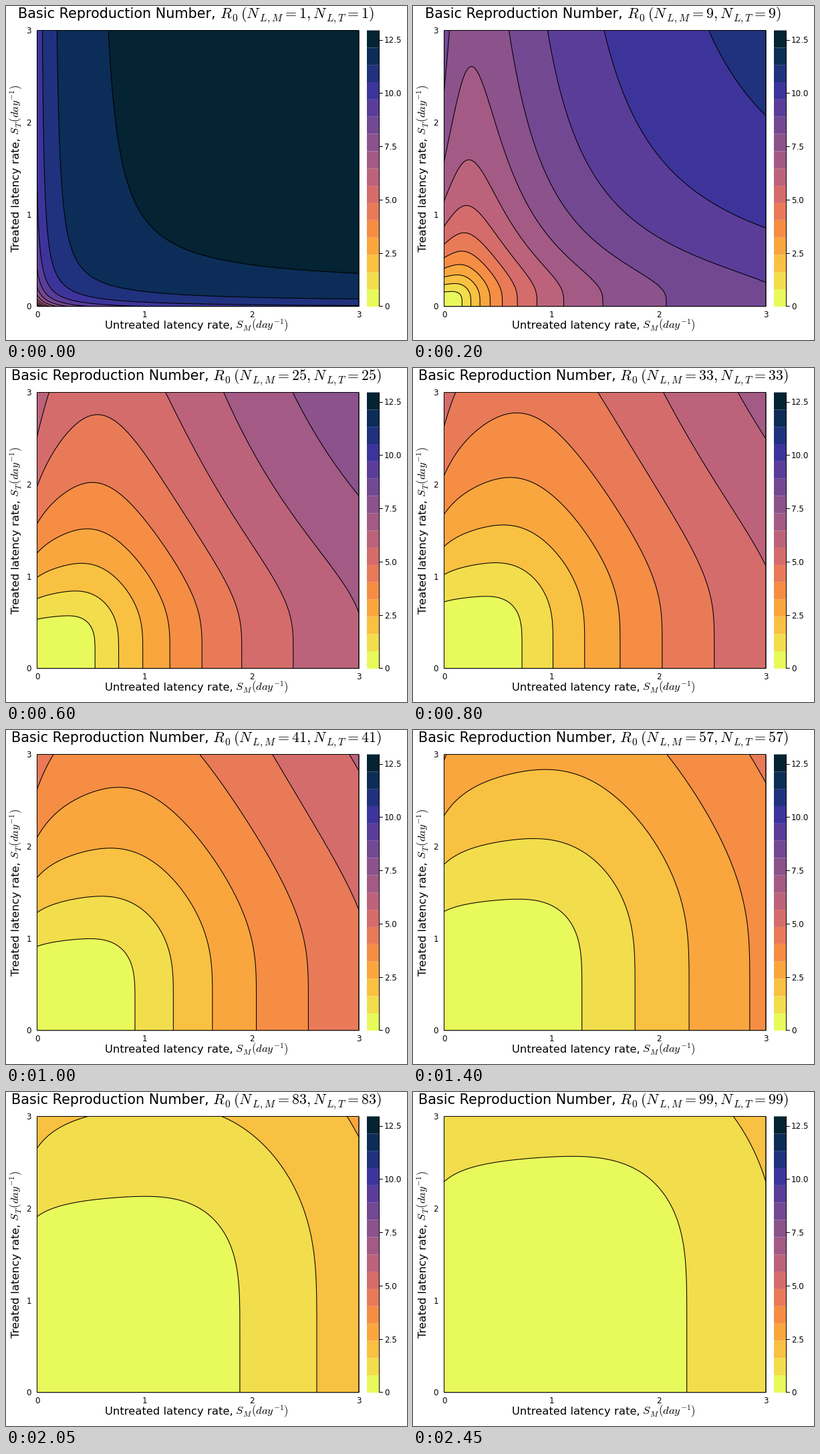
A matplotlib script that plays this animation: 600x500 px, repeating every 2.5 s.

```python
import numpy as np
import matplotlib.pyplot as plt
from matplotlib.animation import FuncAnimation
from matplotlib.colors import ListedColormap
from matplotlib.patches import Rectangle

W, H, DPI = 600, 500, 100
FRAMES, INTERVAL = 50, 50
LEFT, RIGHT, TOP, BOTTOM = 46.5, 528, 36.5, 450
BANDS, R_MAX = 16, 12.955
PT = 72 / DPI

plt.rcParams.update({"font.family": "DejaVu Sans", "mathtext.fontset": "cm"})

# Dark-to-yellow thermal ramp, reversed so that low values are yellow
THERMAL = np.array([
    (4, 35, 51), (13, 48, 100), (53, 50, 155), (93, 62, 153),
    (126, 77, 143), (158, 89, 135), (193, 100, 121), (225, 113, 97),
    (246, 139, 69), (251, 173, 60), (246, 211, 70), (232, 250, 91)]) / 255
ramp = np.linspace(1, 0, BANDS)
knots = np.linspace(0, 1, len(THERMAL))
colors = np.column_stack([np.interp(ramp, knots, c) for c in THERMAL.T])
cmap = ListedColormap(colors)
levels = np.linspace(0, R_MAX, BANDS + 1)

# Grid is denser near zero, where the contours crowd together
rates = 3 * np.linspace(0, 1, 220) ** 2
s_m, s_t = np.meshgrid(rates, rates)

DEATH, SWITCH = 0.12, 0.10


def reproduction_number(n):
    """R0 for n latent stages; untreated may switch in their first stage."""
    first = s_m / (s_m + DEATH + SWITCH)
    untreated = first * (s_m / (s_m + DEATH)) ** (n - 1)
    treated = (1 - 0.496 * first) * (s_t / (s_t + DEATH)) ** n
    return np.sqrt(113.8 * untreated + 102.8 * treated)


fig = plt.figure(figsize=(W / DPI, H / DPI), dpi=DPI, facecolor="white")
ax = fig.add_axes([LEFT / W, 1 - BOTTOM / H,
                   (RIGHT - LEFT) / W, (BOTTOM - TOP) / H])
ax.set(xlim=(0, 3), ylim=(0, 3))
ax.axis("off")

# Overlay in pixel coordinates, y pointing down
page = fig.add_axes([0, 0, 1, 1], zorder=2)
page.set(xlim=(0, W), ylim=(H, 0))
page.axis("off")


def text(x, y, s, size, **kw):
    kw = {"ha": "left", "va": "baseline", **kw}
    return page.text(x, y, s, fontsize=size * PT, color="black", **kw)


def line(xs, ys, width=1):
    page.plot(xs, ys, color="black", lw=width * PT, snap=False,
              solid_capstyle="butt")


def sub(base, index):
    """Symbol with a low-set, slightly detached subscript."""
    return rf"{base}_{{\,{index}}}^{{\,}}"


line([LEFT, LEFT], [TOP, BOTTOM])
line([LEFT, RIGHT], [TOP, TOP])
line([LEFT, RIGHT], [BOTTOM - 0.3, BOTTOM - 0.3], 1.2)
line([RIGHT, RIGHT], [TOP, BOTTOM], 1.5)

for v in range(4):
    text(LEFT + v * (RIGHT - LEFT) / 3, 465.5, str(v), 11.9, ha="center")
    text(38, BOTTOM - v * (BOTTOM - TOP) / 3 + 4.5, str(v), 11.9, ha="right")

# Colour bar
step = (BOTTOM - TOP) / BANDS
for i, c in enumerate(colors):
    page.add_patch(Rectangle((540, BOTTOM - (i + 1) * step), 18, step,
                             facecolor=c, lw=0, snap=False))
line([558.5, 558.5], [TOP, BOTTOM])
for label in ("0", "2.5", "5.0", "7.5", "10.0", "12.5"):
    y = BOTTOM - float(label) / R_MAX * (BOTTOM - TOP)
    tick = np.ceil(y) - 0.5
    line([558, 564], [tick, tick])
    text(566, y + 4.3, label, 11.9)

# Axis labels
up = {"rotation": 90, "rotation_mode": "anchor"}
text(148.5, 483, "Untreated latency rate,", 16.35)
text(343, 483, rf"${sub('S', 'M')}(day^{{-1}})$", 16.6)
text(20, 368, "Treated latency rate,", 16.35, **up)
text(20, 193, rf"${sub('S', 'T')}(day^{{-1}})$", 16.6, **up)

title = text(0, 18, "Basic Reproduction Number,", 20.8)
formula = text(0, 18, "", 22)
drawn = []


def update(frame):
    n = 2 * frame + 1
    while drawn:
        drawn.pop().remove()
    z = reproduction_number(n)
    drawn.append(ax.contourf(s_m, s_t, z, levels, cmap=cmap,
                             vmin=0, vmax=R_MAX))
    drawn.append(ax.contour(s_m, s_t, z, levels[1:-1], colors="black",
                            linewidths=1.05 * PT))
    shift = 0 if n < 10 else 10.5
    title.set_x(18.3 - shift)
    formula.set_x(319.8 - shift)
    formula.set_text(rf"${sub('R', 0)}\,({sub('N', 'L,M')}={n},"
                     rf"{sub('N', 'L,T')}={n})$")
    return drawn


anim = FuncAnimation(fig, update, frames=FRAMES, init_func=lambda: [],
                     interval=INTERVAL, repeat=True, repeat_delay=0,
                     blit=False)
plt.show()
```
